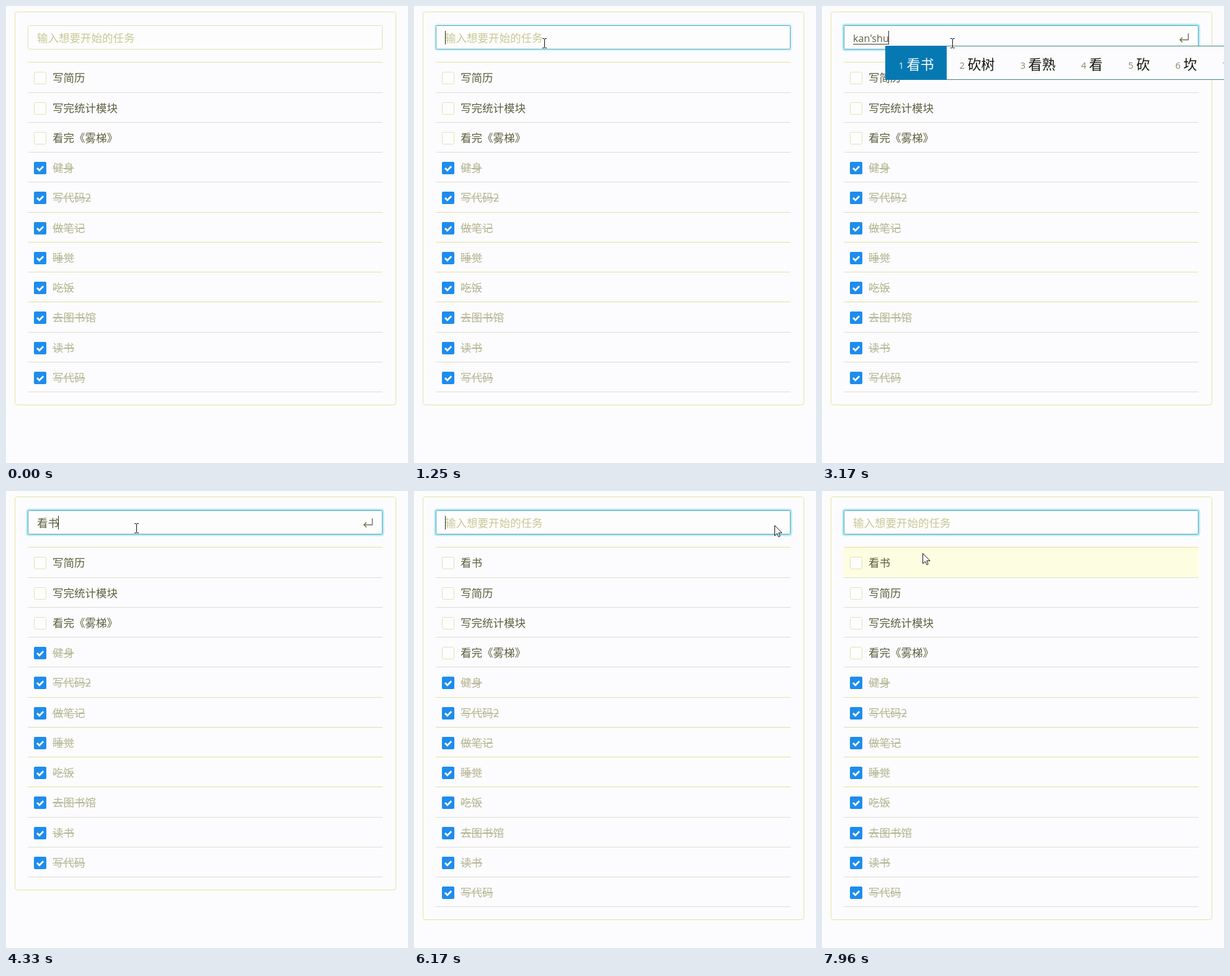
An HTML page for the animation above (8000 ms loop, 648x736 px).

```html
<!DOCTYPE html>
<html lang="zh">
<head>
<meta charset="utf-8">
<title>任务清单</title>
<style>
  html, body { margin: 0; width: 100%; height: 100%; overflow: hidden; background: #fcfcfe; }
  svg { display: block; width: 648px; height: 736px; }
  text { font-family: "Noto Sans CJK SC", "Noto Sans CJK", sans-serif; font-size: 17.5px; white-space: pre; }
  .latin { font-family: "Open Sans", sans-serif; font-size: 16.2px; }
  .num { font-family: "Open Sans", sans-serif; font-size: 15px; }
  .cand { font-size: 22px; }
</style>
</head>
<body>
<svg id="stage" viewBox="0 0 648 736"></svg>
<script>
const LOOP = 8000;
const FOCUS = 1100, COMMIT = 3290, SUBMIT = 6120, BLINK = 530;
const INK = '#5e5e3e', FADED = '#b5b58f', HINT = '#c8c894', RULE = '#e0e0a6';
const stage = document.getElementById('stage');
const pen = document.createElement('canvas').getContext('2d');

const open = ['写简历', '写完统计模块', '看完《雾梯》'];
const done = ['健身', '写代码2', '做笔记', '睡觉', '吃饭', '去图书馆', '读书', '写代码'];

// time, typed letters
const typing = [
  [2130, 'k'], [2230, 'ka'], [2360, 'kan'],
  [2620, "kan's"], [2760, "kan'sh"], [2900, "kan'shu"]
];
// time, letters the candidate window has caught up with, candidates
const lookups = [
  [2180, 'k', '看 可 开 快 卡 靠 考 口'],
  [2290, 'ka', '卡 喀 咯 咖 咔 胩 呿 衉'],
  [2420, 'kan', '看 砍 坎 刊 侃 堪 勘 槛'],
  [2700, "kan's", '看书 看似 看谁 看 砍 坎 刊'],
  [2840, "kan'sh", '看书 看上 看谁 看 砍 坎 刊'],
  [2960, "kan'shu", '看书 砍树 看熟 看 砍 坎 刊']
];
// time, x, y
const path = [
  [130, -8, 150], [900, 210, 60], [5080, 210, 60], [5710, 570, 64],
  [5880, 581, 55], [6280, 581, 55], [6710, 531, 91], [6830, 95, 106],
  [7460, 95, 106], [7960, 162, 100]
];

const clamp = v => Math.max(0, Math.min(1, v));
const latest = (list, t) => list.filter(e => e[0] <= t).pop();
const rect = (x, y, w, h, attrs) => `<rect x="${x}" y="${y}" width="${w}" height="${h}" ${attrs}/>`;
const label = (x, y, s, color, cls = '') => `<text class="${cls}" x="${x}" y="${y}" fill="${color}">${s}</text>`;
const line = (d, color, w = 1) => `<path d="${d}" fill="none" stroke="${color}" stroke-width="${w}"/>`;

function latinWidth(s) {
  pen.font = '16.2px "Open Sans", sans-serif';
  return pen.measureText(s).width;
}

function mouseAt(t) {
  const i = path.findIndex(p => p[0] > t);
  if (i === 0) return path[0].slice(1);
  if (i < 0) return path[path.length - 1].slice(1);
  const [t0, x0, y0] = path[i - 1], [t1, x1, y1] = path[i];
  const u = (t - t0) / (t1 - t0), k = u * u * (3 - 2 * u);
  return [x0 + (x1 - x0) * k, y0 + (y1 - y0) * k];
}

function caretOn(t) {
  if (t < FOCUS) return false;
  if (t >= typing[0][0] && t < COMMIT) return true;
  const start = t < COMMIT ? FOCUS : t < SUBMIT ? COMMIT - 20 : SUBMIT + 30;
  return Math.floor((t - start) / BLINK) % 2 === 0;
}

const ruleY = i => Math.floor(90.8 + 48.25 * i);
const ruleColor = y => y < 100 || (y > 300 && y < 500) ? RULE : '#dddcd2';

function row(name, i, checked) {
  const c = Math.round(116.3 + 48.25 * i);
  let s = checked
    ? rect(45, c - 10, 20, 20, 'rx="2" fill="#1e8cee"') + line(`M50 ${c}l3.8 3.8 6.4-6.6`, '#fff', 2.8)
    : rect(45.5, c - 9.5, 19, 19, 'rx="2" fill="#fdfdfe" stroke="#e2e2b4"');
  s += label(75, c + 6, name, checked ? FADED : INK);
  if (checked) {
    const w = [...name].reduce((sum, ch) => sum + (ch < '~' ? 9.7 : 17.5), 0);
    s += line(`M75 ${c + .5}h${w}`, '#b3b3a0');
  }
  const y = ruleY(i + 1);
  return s + line(`M35 ${y + .5}H607`, ruleColor(y));
}

function list(t, mx, my) {
  const todo = t >= SUBMIT ? ['看书', ...open] : open;
  const count = todo.length + done.length;
  const hover = mx >= 35 && mx < 607 ? Math.floor((my - 90) / 48.25) : -1;
  let s = rect(14.5, 9.5, 614, ruleY(count) + 12, 'rx="4" fill="none" stroke="#e2e2a8"');
  if (hover >= 0 && hover < count) {
    const y = ruleY(hover) + 1;
    s += rect(35, y, 572, ruleY(hover + 1) - y, 'fill="#fdfde1"');
  }
  s += line('M35 90.5H607', RULE);
  todo.forEach((name, i) => s += row(name, i, false));
  done.forEach((name, i) => s += row(name, todo.length + i, true));
  return s;
}

function input(t, over) {
  const glow = clamp((t - FOCUS) / 300);
  const active = over || t >= FOCUS;
  let s = '';
  if (glow) s += rect(34, 30, 574, 41, `rx="3" fill="none" stroke="#b5e9ee" stroke-width="3" opacity="${glow.toFixed(2)}"`);
  s += rect(35.5, 31.5, 571, 38, `rx="2" fill="#fdfdfe" stroke="${active ? '#46a5c4' : '#dfdfb6'}"`);

  const typed = latest(typing, t);
  let caret = 50.5;
  if (!typed || t >= SUBMIT) {
    s += label(50, 58, '输入想要开始的任务', HINT);
  } else {
    if (t < COMMIT) {
      const w = latinWidth(typed[1]);
      s += label(50, 58, typed[1], INK, 'latin') + line(`M50 61.5h${w}`, '#3c3c30');
      caret = Math.round(50 + w) - .5;
    } else {
      s += label(50, 58, '看书', INK);
      caret = 84.5;
    }
    s += line('M590.5 44V54.5H577.5M581 50.5L577 54.5L581 58.5', '#6d6d52', 1.4);
  }
  if (caretOn(t)) s += line(`M${caret} 40V62`, '#2c2c20');
  return s;
}

function candidates(t) {
  const hit = latest(lookups, t);
  if (!hit || t >= COMMIT) return '';
  const left = Math.round(44.5 + latinWidth(hit[1]));
  let s = rect(left + .5, 64.5, 700, 54, 'fill="#fcfcfe" stroke="#43857f"');
  let x = left;
  hit[2].split(' ').forEach((word, i) => {
    const w = 54 + 22 * word.length;
    if (!i) s += rect(x, 64, w + 1, 55, 'fill="#0679b2"');
    if (i < 7) s += label(x + 21.5, 101, i + 1, i ? '#8a8a62' : '#e8f4dc', 'num');
    s += label(x + (i < 7 ? 34.5 : 32), 102, word, i ? '#15150e' : '#fff', 'cand');
    x += w;
  });
  return s;
}

function pointer(x, y, beam) {
  const at = `transform="translate(${Math.round(x)} ${Math.round(y)})"`;
  return beam
    ? `<path ${at} d="M-3 -7.5H0M1 -7.5H4M.5 -7V7M-3 7.5H0M1 7.5H4" stroke="#111" fill="none"/>`
    : `<path ${at} d="M.5 .5V17L4.3 13.4L6.8 18.8L9.2 17.7L6.8 12.4H12Z" fill="#fff" stroke="#111"/>`;
}

let shown = '';
function draw(t) {
  const [mx, my] = mouseAt(t);
  const over = mx >= 35 && mx < 607 && my >= 31 && my < 70;
  const s = list(t, mx, my) + input(t, over) + candidates(t)
    + (t >= 130 ? pointer(mx, my, over && mx < 568) : '');
  if (s !== shown) stage.innerHTML = shown = s;
}

const begin = performance.now();
function tick() {
  draw((performance.now() - begin) % LOOP);
  requestAnimationFrame(tick);
}
tick();
</script>
</body>
</html>
```
